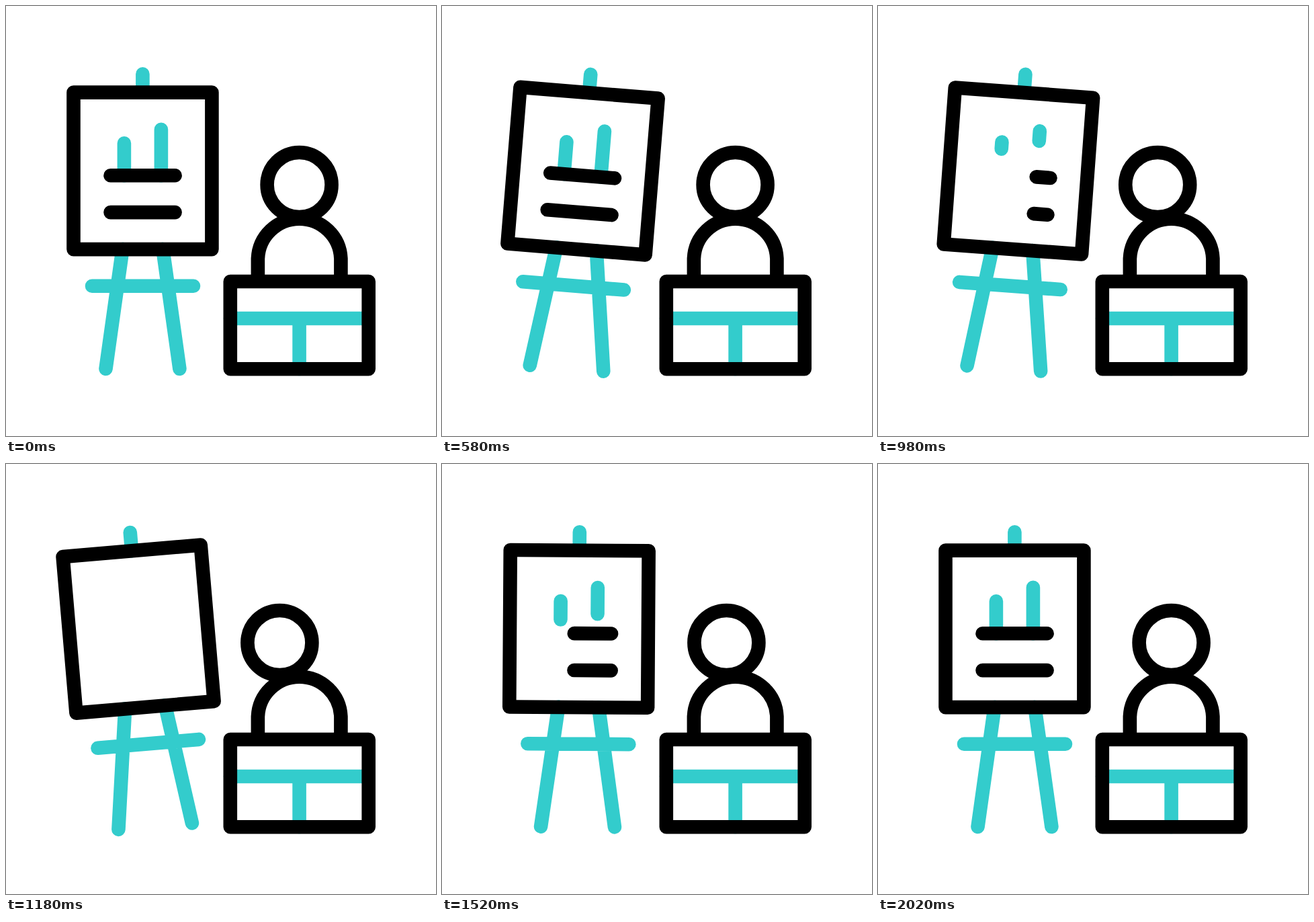
Recreate the animation shown at these times as an HTML page. Size 640 px wide and 640 px high, loop 2400 ms.

```html
<!DOCTYPE html>
<html lang="en">
<head>
<meta charset="utf-8">
<title>Presentation</title>
<style>
  html, body { margin: 0; width: 100%; height: 100%; overflow: hidden; background: #fff; }
  svg { display: block; width: 100%; height: 100%; }
  path, rect, circle {
    fill: none; stroke: #000; stroke-width: 20.6;
    stroke-linecap: round; stroke-linejoin: round;
  }
  .teal { stroke: #3cc; }
</style>
</head>
<body>
<svg viewBox="0 0 640 640">
  <g id="easel">
    <path class="teal" d="M203.4 101.2V128.5M173.5 362L148.5 540M233.4 362L258.4 540M128 416.7H279"/>
    <rect x="100.5" y="128.6" width="205.9" height="233.5"/>
    <path id="bars" class="teal"/>
    <path id="lines"/>
  </g>
  <path class="teal" d="M334 465H539.6M436.6 465V540"/>
  <path d="M374.9 409.8V376A61.8 61.8 0 0 1 498.4 376V409.8"/>
  <circle id="head" cx="436.6" cy="266" r="48"/>
  <rect x="333.8" y="410" width="205.9" height="130.2"/>
</svg>
<script>
  const LOOP = 2400, STEP = 20;
  const el = id => document.getElementById(id);
  const easel = el('easel'), bars = el('bars'), lines = el('lines'), head = el('head');

  // Keys are [time, value] pairs, eased in and out between neighbours.
  const SWING = [[400, 0], [800, 11], [1200, -5], [1600, 1], [2000, 0]];
  const SLIDE = [[600, 0], [1200, -29.3], [1800, 0]];
  const INK = [[700, 1], [1100, 0], [1300, 0], [1700, 1]];

  function track(keys, t) {
    if (t <= keys[0][0]) return keys[0][1];
    for (let i = 1; i < keys.length; i++) {
      const [t0, a] = keys[i - 1], [t1, b] = keys[i];
      if (t < t1) {
        const u = (t - t0) / (t1 - t0);
        return a + (b - a) * u * u * (3 - 2 * u);
      }
    }
    return keys[keys.length - 1][1];
  }

  function draw(t) {
    const ink = track(INK, t);
    const bar = (x, y) => `M${x} ${y}V${y + (252.1 - y) * ink}`;
    const line = y => `M251.6 ${y}H${251.6 - 96.1 * ink}`;

    easel.setAttribute('transform', `rotate(${track(SWING, t)} 203.4 320)`);
    head.setAttribute('transform', `translate(${track(SLIDE, t)} 0)`);
    bars.setAttribute('d', ink > 0 ? bar(175.9, 204.2) + bar(230.9, 183.8) : '');
    lines.setAttribute('d', ink > 0 ? line(252.2) + line(307.1) : '');
  }

  let start;
  function frame(now) {
    if (start === undefined) start = now;
    const t = (now - start) % LOOP;
    draw(Math.floor(t / STEP) * STEP);
    requestAnimationFrame(frame);
  }
  draw(0);
  requestAnimationFrame(frame);
</script>
</body>
</html>
```
